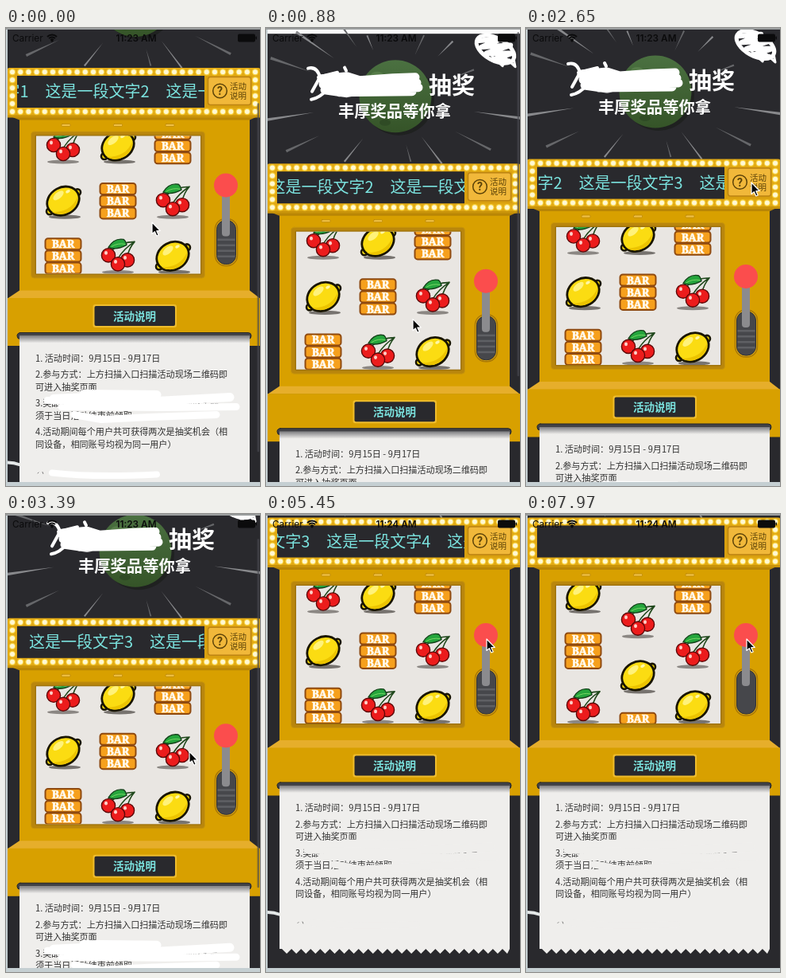
These frames come from a looping animation (320 px wide and 575 px high, 8 s). An HTML page with a canvas:

```html
<!DOCTYPE html>
<html lang="zh">
<head>
<meta charset="utf-8">
<style>
html, body { margin: 0; width: 100%; height: 100%; overflow: hidden; background: #c5cfd2; }
canvas { display: block; width: 320px; height: 575px; }
</style>
</head>
<body>
<canvas id="stage"></canvas>
<script>
const canvas = document.getElementById('stage');
const ctx = canvas.getContext('2d');
const dpr = window.devicePixelRatio || 1;
canvas.width = 320 * dpr;
canvas.height = 575 * dpr;

const LOOP = 8000, STEP = 147.5, SPIN_START = 5750, SPIN_END = 7965;
const GOLD = '#d8a000', DARK = '#29292d', TEAL = '#7be3df', PAPER = '#efeeec';
const CJK = '"Noto Sans CJK SC", "Noto Sans CJK", sans-serif';
const PITCH = 69.2;

// Time tracks: [ms, value...]
const SCROLL = [[0, 45.5], [880, 165.5], [1480, 188.5], [1620, 188.5], [1770, 171], [1950, 160],
  [3150, 160], [3350, 135], [3950, 12], [4200, 0]];
const CURSOR = [[0, 184, 244], [880, 185, 365], [1480, 187, 406], [1700, 190, 406], [2500, 284, 194],
  [2800, 284, 194], [3150, 231, 332], [3350, 231, 307], [3950, 231, 184], [4200, 231, 172],
  [4700, 231, 172], [5300, 278, 157]];
const LEVER = [[5700, 0], [6000, 75], [6250, 75], [6800, 0]];

function track(keys, t) {
  const i = keys.findIndex(k => k[0] > t);
  if (i === 0) return keys[0].slice(1);
  if (i < 0) return keys[keys.length - 1].slice(1);
  const a = keys[i - 1], b = keys[i], p = (t - a[0]) / (b[0] - a[0]);
  return a.slice(1).map((v, n) => v + (b[n + 1] - v) * p);
}

function paint(fill, stroke, width = 1) {
  if (fill) { ctx.fillStyle = fill; ctx.fill(); }
  if (stroke) { ctx.strokeStyle = stroke; ctx.lineWidth = width; ctx.stroke(); }
}
function rect(x, y, w, h, fill) { ctx.fillStyle = fill; ctx.fillRect(x, y, w, h); }
function box(x, y, w, h, r, fill, stroke, width) {
  ctx.beginPath(); ctx.roundRect(x, y, w, h, r); paint(fill, stroke, width);
}
function oval(x, y, rx, ry, fill, stroke, width, angle = 0) {
  ctx.beginPath(); ctx.ellipse(x, y, rx, ry, angle, 0, 7); paint(fill, stroke, width);
}
function poly(points, fill, stroke, width) {
  ctx.beginPath(); points.forEach(p => ctx.lineTo(...p)); ctx.closePath(); paint(fill, stroke, width);
}
function curve(d, fill, stroke, width) {
  const path = new Path2D(d);
  if (fill) { ctx.fillStyle = fill; ctx.fill(path); }
  if (stroke) { ctx.strokeStyle = stroke; ctx.lineWidth = width; ctx.stroke(path); }
}
function text(str, x, y, font, color, align = 'left') {
  ctx.font = font; ctx.fillStyle = color; ctx.textAlign = align; ctx.fillText(str, x, y);
}
function clipped(x, y, w, h, draw) {
  ctx.save(); ctx.beginPath(); ctx.rect(x, y, w, h); ctx.clip(); draw(); ctx.restore();
}
function vertical(y1, y2, from, to) {
  const fade = ctx.createLinearGradient(0, y1, 0, y2);
  fade.addColorStop(0, from);
  fade.addColorStop(1, to);
  return fade;
}

// Rays around the header disc: angle, inner radius, outer radius
const RAYS = [[2.99, 102, 161], [3.47, 110, 164], [3.75, 92, 150], [4.1, 82, 110], [4.32, 68, 88],
  [5.15, 62, 90], [5.5, 78, 105], [5.92, 78, 108], [.14, 102, 162], [.47, 87, 137], [.92, 57, 100],
  [1.3, 58, 80], [2.25, 62, 99], [2.7, 104, 150]];

function drawHeader() {
  rect(0, -158.5, 320, 740, DARK);
  const cx = 161, cy = -75;
  RAYS.forEach(([angle, near, far], i) => {
    const at = (r, off) => [cx + r * Math.cos(angle + off), cy + r * Math.sin(angle + off)];
    poly([at(near, 0), at(far, -.011), at(far, .011)], i % 2 ? '#66676a' : '#88898c');
  });
  oval(167, -76, 45, 45, '#1f2120');
  oval(163, -80, 45.5, 45.5, vertical(-126, -35, '#4b7141', '#355428'));
  oval(140, -106, 8, 5, '#567c49');
  oval(188, -104, 5, 5, '#3e6134');
  oval(150, -47, 7, 4, '#2f4b25');
  text('抽奖', 205, -83, 'bold 29px ' + CJK, '#fff');
  text('丰厚奖品等你拿', 162, -53.5, 'bold 20.3px ' + CJK, '#fff', 'center');
  curve('M70-102L102-105L118-100L160-103L188-104M72-95L190-97M74-88L102-84L140-90L192-91M92-85L184-86',
    null, '#fff', 11);
  curve('M53-115Q64-118 68-104L58-86M57-76Q68-78 76-88L66-104L90-110M99-116L101-112', null, '#fff', 4);

  oval(289, -139, 26, 14, null, '#fff', 5, .5);
  curve('M268-150L296-152L272-142L308-144L278-134L310-134L286-126L306-124', null, '#fff', 6.5);
  curve('M284-131L298-118L302-128L314-117L310-138', null, '#fff', 3);
}

function drawCherry() {
  oval(0, 20, 20, 2.5, '#8b8783');
  curve('M21-18Q4-18-11-5M21-18Q8-10 0 3M21-18Q14-10 12 0', null, '#20481c', 1.6);
  curve('M11-14Q-2-7-12-11Q-5-23 7-21Q10-19 11-14Z', '#25a53c', '#14401a', 1.4);
  curve('M9-15Q0-17-8-12', null, '#77d464', 1);
  [[-12, -1], [12, 5], [0, 10]].forEach(([x, y]) => {
    oval(x, y, 8.6, 8.6, '#ec1c1c', '#5c0808', 1.4);
    oval(x - 3, y - 3, 2, 2.4, '#ffd0c8');
  });
}

function drawLemon() {
  const ink = '#191500', tilt = -.5;
  oval(2, 20, 20, 2.6, '#77736f');
  oval(-17, 13, 4, 4, '#fbdc12', ink, 2.6);
  oval(18, -11, 4, 4, '#fbdc12', ink, 2.6);
  oval(0, 0, 21, 17.2, '#fbdc12', ink, 2.8, tilt);
  curve('M-14 14Q10 14 18-5Q18 11 2 16Q-8 18-14 14Z', '#ecc400');
  oval(-6, -7, 8, 4, '#fff27a', null, 0, -.7);
  oval(6, -12, 3, 1.8, '#fff7a6', null, 0, tilt);
}

function drawBar() {
  for (const y of [-15.2, 0, 15.2]) {
    box(-22.5, y - 7, 45, 14, 3.5, '#f6a01d', '#8f4a10', 2);
    ctx.font = '900 13.5px "Noto Serif", serif';
    ctx.textAlign = 'center';
    ctx.strokeStyle = ctx.fillStyle = '#fffaf0';
    ctx.lineWidth = .7;
    ctx.strokeText('BAR', 0, y + 5);
    ctx.fillText('BAR', 0, y + 5);
  }
}

const SYMBOLS = [drawCherry, drawLemon, drawBar];
const TRAVEL = [13, 13.55, 15];

function drawReels(t) {
  box(31.5, 84.5, 219, 184, 4, '#b9860c', '#c9960a', 1);
  box(36.5, 88.5, 210, 176, 2, '#a0740d');
  rect(38, 90, 207, 173, '#e9e6e2');
  const progress = Math.min(1, Math.max(0, (t - SPIN_START) / (SPIN_END - SPIN_START)));
  clipped(38, 90, 207, 173, () => {
    TRAVEL.forEach((distance, col) => {
      const shift = distance * progress, first = Math.floor(shift) - 1;
      for (let k = first; k < first + 6; k++) {
        ctx.save();
        ctx.translate(72 + 69 * col, 102.5 + PITCH * (k - shift));
        SYMBOLS[(k + col + 3) % 3]();
        ctx.restore();
      }
    });
  });
}

function drawLever(t) {
  const pull = track(LEVER, t)[0];
  box(263.5, 194, 28, 59, 13, '#e0aa12', '#a87706', 1.5);
  box(265.5, 196, 24, 55, 11, '#46474b', '#303135', 1);
  if (t < 5700) {
    for (let y = 219; y < 246; y += 7) rect(266.5, y, 22, 2.5, '#5f6064');
  }
  const ballY = 152 + pull;
  box(272, Math.min(ballY, 205), 10, Math.abs(211 - ballY) + 5, 4, '#8b8b8e');
  oval(277, ballY, 15, 15, '#fb4d4d');
}

function drawBoard(t) {
  poly([[2, 64], [320, 64], [307, 70], [17, 70]], '#b98606');
  box(1.5, 4.5, 319, 61, 3, '#e2a914');
  rect(2, 64, 318, 3, '#c9940a');
  const bulb = (x, y) => {
    oval(x, y, 4.2, 4.2, '#f6d03b');
    oval(x, y, 3, 3, '#fff8d2');
  };
  for (let i = 0; i < 31; i++) { bulb(8 + i * 10.2, 9.8); bulb(8 + i * 10.2, 59.5); }
  for (let i = 1; i < 5; i++) { bulb(8, 9.8 + i * 9.95); bulb(314, 9.8 + i * 9.95); }
  rect(14, 14.5, 296, 40, '#d9a00f');
  rect(14, 14.5, 236, 40, DARK);
  if (t < SPIN_END - 5) {
    clipped(14, 14.5, 236, 40, () => {
      for (let i = 0; i < 5; i++) {
        text('这是一段文字' + (i + 1), -102.6 + i * 152 - t * .0508, 41.7, '20px ' + CJK, TEAL);
      }
    });
  }
  box(254.5, 16, 54, 35, 3, '#f1b83a', '#bd8412', 1.5);
  oval(269.5, 33.5, 8.8, 8.8, null, '#5c4308', 1.5);
  text('?', 269.5, 38.5, 'bold 14px Roboto, sans-serif', '#5c4308', 'center');
  text('活动', 282, 31.5, '10.5px ' + CJK, '#5c4308');
  text('说明', 282, 43.5, '10.5px ' + CJK, '#5c4308');
}

function drawMachine(t) {
  rect(17, 66, 290, 220, GOLD);
  for (const x of [70, 135.5, 201]) box(x, 75, 11, 3, 1, '#f0c044', '#b78508', .7);
  drawReels(t);
  drawLever(t);
  poly([[17, 284], [307, 284], [320, 294], [2, 294]], '#e6ae2b');
  rect(2, 293.5, 318, 60, GOLD);
  box(109.5, 301.5, 105.5, 29, 3, '#efbd2d');
  box(111.5, 303.5, 101.5, 25, 2, DARK);
  text('活动说明', 162, 321, 'bold 13.5px ' + CJK, TEAL, 'center');
  drawBoard(t);
}

const RULES = [
  ['1. 活动时间：9月15日 - 9月17日', 373], ['2.参与方式：上方扫描入口扫描活动现场二维码即', 393.5],
  ['可进入抽奖页面', 409], ['3.奖品领取：获奖用户请到现场服务台领取奖品', 429.5],
  ['须于当日活动结束前领取', 445], ['4.活动期间每个用户共可获得两次是抽奖机会（相', 465.5],
  ['同设备，相同账号均视为同一用户）', 481]
];

function drawPaper(scroll) {
  curve('M2 500Q10 500 18 503', null, '#e4e8e8', 4);
  box(14, 337, 295, 8, 4, '#414247', '#25262a', 1);
  const edge = [[17, 341], [307, 341], [307, 546]];
  for (let i = 0; i < 48; i++) edge.push([307 - (i + .5) * 290 / 48, i % 2 ? 546 : 552]);
  edge.push([17, 546]);
  poly(edge, PAPER);
  rect(17, 341, 290, 9, vertical(341, 350, 'rgba(90,90,95,.75)', 'rgba(90,90,95,0)'));
  for (const [line, y] of RULES) text(line, 37, y, '11.1px ' + CJK, '#303030');

  // Correction strokes over part of the rules
  const cover = scroll > 20 ? '#fff' : PAPER;
  curve('M98 414L190 415M60 420L124 417L190 423L282 418', null, cover, 11);
  curve('M52 422L190 425M70 430L200 431L290 430', null, cover, 9);
  curve('M86 440L120 446L180 443L265 440', null, cover, 9);
  curve('M58 513Q110 519 190 515', null, cover, 8);
  curve('M40 513.5l1-1M46 512l.8 2', null, '#777', 1);
}

function drawStatus(t) {
  const ink = '#0b0b0c';
  text('Carrier', 8, 16.5, '11.8px Inter, sans-serif', ink);
  ctx.lineCap = 'butt';
  for (const r of [3, 6, 9]) {
    ctx.beginPath(); ctx.arc(58, 17, r - .5, -2.35, -.79); paint(null, ink, 2);
  }
  oval(58, 16.2, 1.3, 1.3, ink);
  ctx.lineCap = 'round';
  text(t < 3400 ? '11:23 AM' : '11:24 AM', 164, 16.5, '600 11.8px Inter, sans-serif', ink, 'center');
  box(292, 7.5, 22, 10, 2, ink);
  box(314.5, 10.5, 1.5, 4, .7, ink);
}

function drawIndicator(scroll, t) {
  if (t > 2300 && t < 3100 || t > 4250) return;
  box(316.5, 5 + Math.max(0, 160 - scroll) * .78, 2.5, 438 - Math.max(0, scroll - 160), 1.2, 'rgba(75,75,80,.65)');
}

function drawCursor(x, y) {
  ctx.save();
  ctx.translate(x, y);
  poly([[0, 0], [0, 14.5], [3.3, 11.6], [5.8, 17], [8.2, 16], [5.8, 10.7], [10.3, 10.5]], '#050505', '#fff', 1.2);
  ctx.restore();
}

function render(now) {
  const t = Math.floor((now % LOOP + 8) / STEP) * STEP;
  const scroll = track(SCROLL, t)[0];
  ctx.setTransform(dpr, 0, 0, dpr, 0, 0);
  ctx.lineJoin = ctx.lineCap = 'round';
  rect(0, 0, 320, 575, '#c5cfd2');
  rect(0, 0, 320, 2, '#9b9e9e');
  clipped(2, 2, 318, 568, () => {
    rect(2, 2, 318, 568, '#fcfcfc');
    ctx.save();
    ctx.translate(0, scroll);
    drawHeader();
    rect(2, 353, 318, 230, DARK);
    drawMachine(t);
    drawPaper(scroll);
    ctx.restore();
    drawIndicator(scroll, t);
    drawStatus(t);
    drawCursor(...track(CURSOR, t));
  });
}

const start = performance.now();
function tick() {
  render(performance.now() - start);
  requestAnimationFrame(tick);
}
tick();
</script>
</body>
</html>
```
